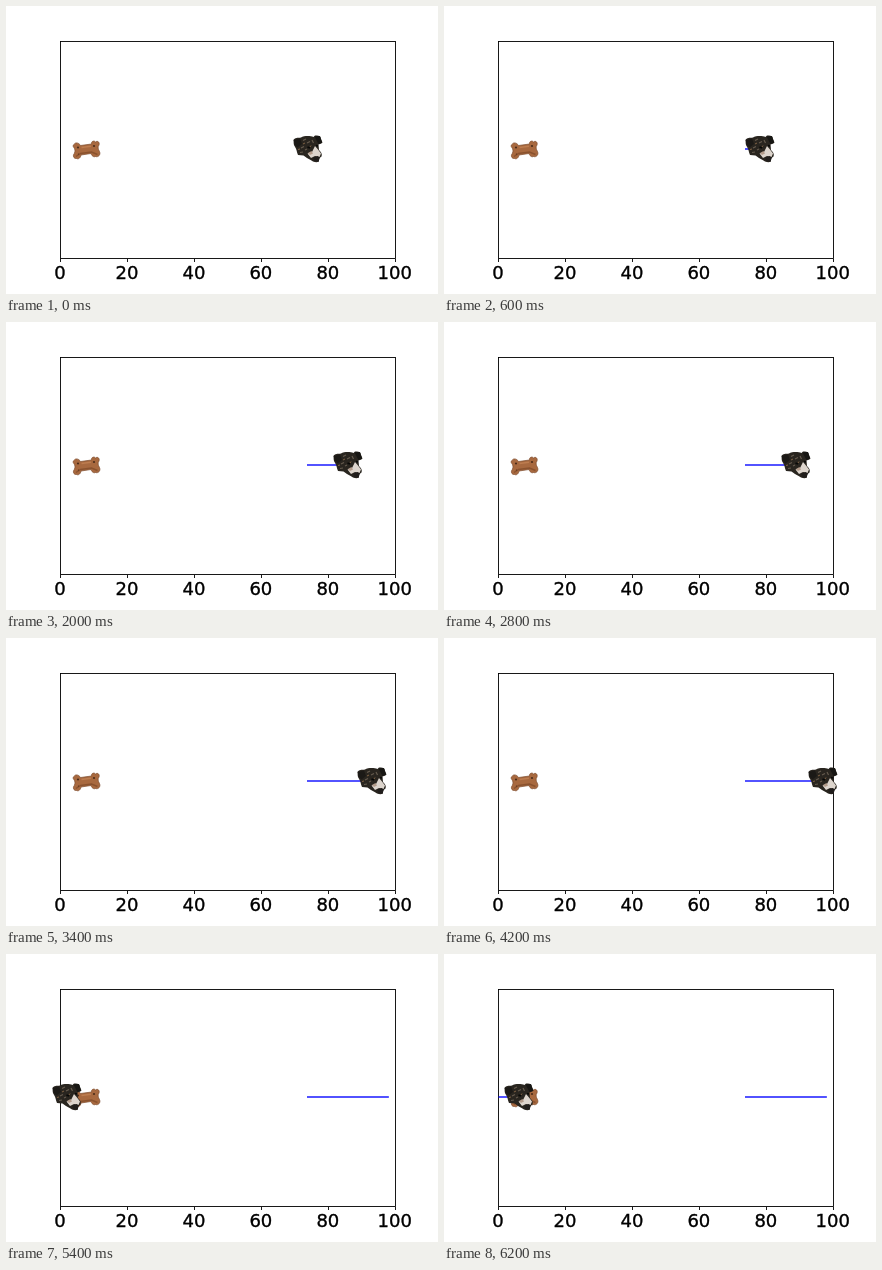
These frames come from a looping animation (432 by 288 pixels, 6400 ms). An HTML page:

```html
<!DOCTYPE html>
<html lang="en">
<head>
<meta charset="utf-8">
<title>Dog on a track</title>
<style>
  html, body { margin: 0; width: 100%; height: 100%; overflow: hidden; background: #fff; }
  svg { display: block; width: 432px; height: 288px; }
  text { font: 18px "DejaVu Sans", sans-serif; text-anchor: middle; stroke: #000; stroke-width: .35; }
</style>
</head>
<body>
<svg viewBox="0 0 432 288">
  <g id="axis">
    <rect x="54.5" y="35.5" width="335" height="217" fill="#fff" stroke="#000" stroke-width=".9"/>
  </g>
  <path id="trail" fill="none" stroke="#00f" stroke-width="1.5" stroke-opacity=".9"/>

  <g id="bone">
    <path d="M68 138.500C69 136 73 136.500 74.500 139.500L85.500 138C85 135.500 88 134 89.500 136C91.500 134.200 94 136.500 93 139C91.500 141 92 143 93.500 145.500C95 149 92 151.500 89.500 150.500C87.500 151.500 85.500 149.500 85 147.500L75 149C74.500 152 72.500 153.500 70.500 152.500C67.500 152.800 66.500 149.500 68.300 147.500C69.500 145 69 143 67.800 141.500C66.800 140.500 67 139 68 138.500Z" fill="#a8693f" stroke="#7d4d2e" stroke-width=".7"/>
    <path d="M70 150.500L74.500 147.500 85.500 146 91.500 148.500" fill="none" stroke="#8a522e" stroke-width="1.500"/>
    <path d="M75.500 141.500L85 140.300" stroke="#bd7d50" stroke-width="1.500"/>
    <g fill="#4b2c1a">
      <circle cx="72" cy="141.500" r="1.100"/>
      <circle cx="88" cy="140" r="1.100"/>
      <circle cx="72.500" cy="148" r=".6"/>
    </g>
  </g>

  <g id="dog">
    <path d="M.5 5C1.500 2.500 5 3 8 2.500C11 .8 17 .7 20.500 2L22 .6C25 0 28 .8 27.800 3.500L29.500 7.500C28 9.500 26 9 25.500 9.500L26 15C28 17 29.500 19 28.500 21.500L26 23.500 26 26.500C23.500 28 20.500 27 18.500 25.500L14 23 10.500 20.500 5 20C3.500 17 4 14.500 1.800 11.500C.3 9.500 .8 7.500 .5 5Z" fill="#29251f"/>
    <path d="M.7 5L7 3.500 9 9 4.500 12.500 1.800 10Z" fill="#1b1916"/>
    <path d="M21.500 1.500L27 1 29 7.500 25.500 9Z" fill="#171613"/>
    <path d="M14.500 18.500L19 17 22 11 25 14.500 28 18.500 26.500 22 22 21 18 23Z" fill="#ddd5cd"/>
    <path d="M15 18L18.500 16 20 18.500 17 20Z" fill="#b49c8b"/>
    <path d="M20.500 22.500L24.500 21 27 22.500 25.500 26.500 21 26Z" fill="#211e1c"/>
    <path d="M10 5.500L13 4M14 8L17 6.500M8 13L11 11.500M12 15L14 14M7 17.500L10 17M19 5L20.500 8" stroke="#655b4e" stroke-width="1.200"/>
    <path d="M10 9L12 8M17 12L18 10.500M5 14.500L7 14" stroke="#806143"/>
    <path d="M14.500 12L17 13M23 10.500L25 11" stroke="#080807" stroke-width="1.800"/>
  </g>
</svg>
<script>
const STEP = 200, START = 74, LEFT = 54, UNIT = 3.348, MID = 143;
const moves = [1,2,1,2,1,1, 1,1,1,1,1,1, 0,1,1,1,2,1,1, 1,1,1,0, 2,1,0,1,1,1,1,1];

const $ = id => document.getElementById(id);
const px = v => LEFT + v * UNIT;

for (let v = 0; v <= 100; v += 20) {
  const x = Math.floor(px(v) + .3) + .5;
  $("axis").insertAdjacentHTML("beforeend",
    `<path d="M${x} 253v3" stroke="#000" stroke-width=".9"/><text x="${px(v)}" y="273">${v}</text>`);
}

// Distance along the track at each step; passing 100 wraps to 0.
const track = [START];
for (const m of moves) track.push(track[track.length - 1] + m);

function poseAt(step) {
  const total = track[step], wrapped = total >= 100;
  const v = total % 100;
  const peak = wrapped ? Math.max(...track.filter(p => p < 100)) : total;
  let d = peak > START ? `M${px(START) - .75} ${MID}H${px(peak) + .75}` : "";
  if (wrapped) d += `M${LEFT + .5} ${MID}H${px(v) + .75}`;
  $("trail").setAttribute("d", d);
  $("dog").setAttribute("transform", `translate(${Math.ceil(px(v) - 15)} 129)`);
}

const begin = performance.now();
function tick() {
  const t = performance.now() - begin;
  poseAt(Math.floor(t / STEP) % track.length);
  requestAnimationFrame(tick);
}
tick();
</script>
</body>
</html>
```
